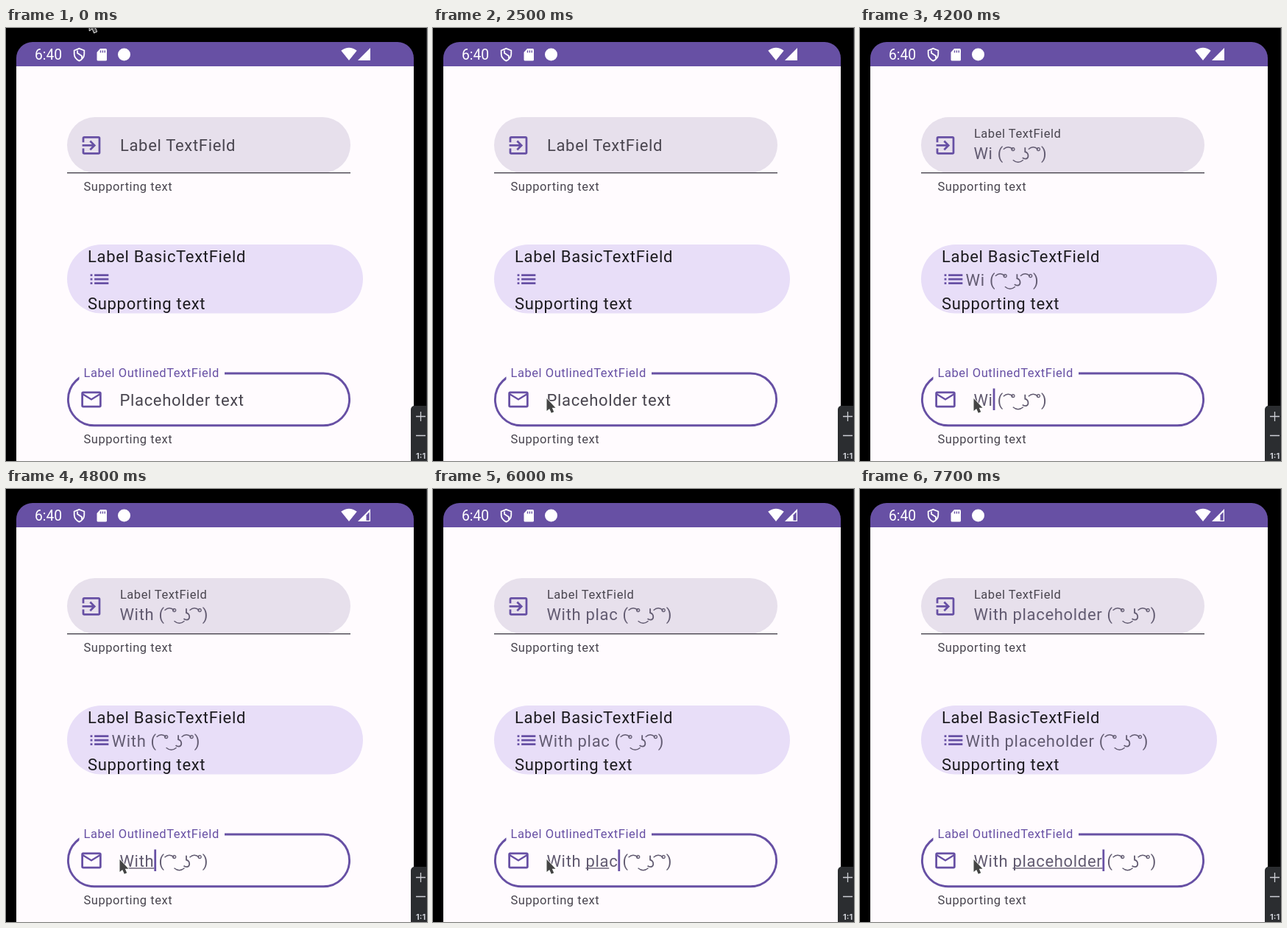
An HTML page that plays this animation: 572x588 px, repeating every 8000 ms.

```html
<!DOCTYPE html>
<html lang="en">
<head>
<meta charset="utf-8">
<style>
  html, body { margin: 0; width: 100%; height: 100%; overflow: hidden; background: #000; }
  svg { display: block; width: 572px; height: 588px; }
  text { font: 22px Roboto, sans-serif; letter-spacing: .687px; white-space: pre; fill: #49454f; }
  .small { font-size: 16.5px; letter-spacing: .55px; }
  .dark { fill: #1c1b1f; }
  .accent { fill: #6750a4; }
  .typed { fill: #625b71; }
  .stroke { fill: none; stroke: #625b71; }
</style>
</head>
<body>
<svg viewBox="0 0 572 588">
  <defs>
    <g id="face">
      <text class="typed" x="0 17 51.5 59.2">(°°)</text>
      <path class="stroke" stroke-width="1.4" d="M8-13Q14.5-19 21-13M21 1.5Q28 7.5 35 1.5M42-13Q48.5-19 55-13"/>
      <path class="stroke" stroke-width="1.8" d="M37.5-15.5V-9.5C43-8 43 0 38 0Q35.5 0 34-1.5"/>
    </g>
  </defs>
  <rect width="572" height="588"/>
  <rect x="571" width="1" height="588" fill="#2b2d30"/>

  <path fill="#fffbfe" d="M14 50H554V588H14z"/>
  <path class="accent" d="M14 52V41a22 22 0 0 1 22-22H532a22 22 0 0 1 22 22V52z"/>
  <text x="39" y="43.2" style="font-size:19.3px;letter-spacing:0;fill:#fff">6:40</text>
  <g fill="none" stroke="#fff" stroke-width="1.8">
    <path d="M99.5 27.8L106.3 30.5V35.5Q106 41.5 99.5 44.6Q93 41.5 92.7 35.5V30.5z"/>
    <path d="M97 30.500V34L103 38V41.500"/>
  </g>
  <path fill="#fff" d="M128 28H135.5a1.5 1.5 0 0 1 1.5 1.5V43a1.5 1.5 0 0 1-1.5 1.5H125a1.5 1.5 0 0 1-1.5-1.5V33z"/>
  <path stroke="#6750a4" stroke-width="1.4" d="M128.5 30.5v3M131.400 30.5v3M134.300 30.5v3"/>
  <circle cx="160.5" cy="36" r="8.5" fill="#fff"/>
  <path fill="#fff" d="M466 44L455.3 30.7Q466 23 476.7 30.7zM495 27V44H478z"/>
  <path id="weakSignal" class="accent" d="M489.500 35.500L493.7 31.300V42.700H489.500z"/>

  <rect x="83" y="121" width="385" height="76" rx="38" fill="#e7e0ec"/>
  <rect x="83" y="196" width="385" height="1.4" fill="#49454f"/>
  <path class="accent" transform="translate(99.5 143) scale(1.374)" d="M10.09 15.59L11.5 17l5-5-5-5-1.41 1.41L12.67 11H3v2h9.67zM19 3H5a2 2 0 0 0-2 2v4h2V5h14v14H5v-4H3v4a2 2 0 0 0 2 2h14a2 2 0 0 0 2-2V5a2 2 0 0 0-2-2z"/>
  <text id="label">Label TextField</text>
  <text class="small" x="105.5" y="220.7">Supporting text</text>

  <rect x="83" y="294" width="402" height="93.5" rx="46.7" fill="#e8def8"/>
  <text class="dark" x="111" y="317.7">Label BasicTextField</text>
  <path class="accent" transform="translate(110.5 324.7) scale(1.374)" d="M3 13h2v-2H3zM3 17h2v-2H3zM3 9h2V7H3zM7 13h14v-2H7zM7 17h14v-2H7zM7 7v2h14V7z"/>
  <text class="dark" x="111" y="381.7">Supporting text</text>

  <rect x="84.4" y="469" width="382.2" height="70.8" rx="35.4" fill="none" stroke="#6750a4" stroke-width="2.9"/>
  <rect x="99.5" y="460" width="197.5" height="18" fill="#fffbfe"/>
  <text class="small accent" x="105.5" y="474">Label OutlinedTextField</text>
  <path class="accent" transform="translate(99.5 488) scale(1.374)" d="M22 6a2 2 0 0 0-2-2H4a2 2 0 0 0-2 2v12a2 2 0 0 0 2 2h16a2 2 0 0 0 2-2zm-2 0l-8 5-8-5zm0 12H4V8l8 5 8-5z"/>
  <text id="placeholder" x="154.4" y="513.2">Placeholder text</text>
  <text class="small" x="105.5" y="564">Supporting text</text>

  <g id="fields"></g>
  <rect id="underline" y="514.3" height="1.4" fill="#625b71"/>
  <rect id="caret" class="accent" y="489.5" width="2.75" height="29.5"/>

  <path fill="#2b2d30" d="M572 513H555a5 5 0 0 0-5 5V588H572z"/>
  <path stroke="#ced0d6" stroke-width="1.3" d="M557 527.5h13M563.5 521v13M557 553.5h13"/>
  <text x="557" y="584.7" style="font:bold 11px Inter,sans-serif;letter-spacing:0;fill:#ced0d6">1:1</text>

  <path id="pointer" fill="#444" stroke="#fff" stroke-width="1.6" stroke-linejoin="round" paint-order="stroke" d="M.5.5V17.5L4.2 14.500L6.800 20.300L10.200 18.800L7.800 13.300H12.500z"/>
</svg>
<script>
const LOOP = 8000, STEP = 100;
const PHRASE = "With placeholder", TEXT_X = 154.4;
const $ = id => document.getElementById(id);

// [time, typed characters, end of the underlined part]
const TYPING = [
  [0, 0, 0], [4100, 1, 0], [4200, 2, 0], [4400, 3, 2], [4600, 4, 3], [4800, 4, 4],
  [5200, 5, 4], [5300, 5, 0], [5500, 6, 0], [5800, 7, 6], [5900, 8, 7], [6000, 9, 8],
  [6200, 10, 9], [6300, 10, 10], [6700, 11, 0], [6900, 12, 11], [7100, 13, 12],
  [7200, 14, 13], [7400, 15, 14], [7500, 16, 15], [7700, 16, 16]
];
const BLINKS = [400, 900, 1000, 1500, 2000, 2500, 3000, 3500, 4000, 5100, 5200];
// [start, end, x, y]
const MOVES = [[0, 400, 166, 440], [700, 1000, 178.5, 504], [1800, 2100, 154, 502.5]];

const ruler = document.createElement("canvas").getContext("2d");
ruler.font = "22px Roboto, sans-serif";
ruler.letterSpacing = "0.687px";
const widthOf = s => ruler.measureText(s).width;
const clamp = v => Math.max(0, Math.min(1, v));
const show = (el, on) => el.setAttribute("visibility", on ? "visible" : "hidden");
const place = (el, x, y) => el.setAttribute("transform", `translate(${x} ${y})`);

const ROWS = [[TEXT_X, 177.7], [143.5, 349.7], [TEXT_X, 513.2]];
$("fields").innerHTML = ROWS.map(([x, y]) =>
  `<g transform="translate(${x} ${y})"><text class="typed"></text><use href="#face"/></g>`).join("");
const rows = [...$("fields").children];

function drawPointer(t) {
  let x = 113, y = -14;
  for (const [start, end, toX, toY] of MOVES) {
    const p = clamp((t - start) / (end - start));
    const k = p * p * (3 - 2 * p);
    x += (toX - x) * k;
    y += (toY - y) * k;
  }
  place($("pointer"), x, y);
}

function drawText(t) {
  const [, count, lineEnd] = TYPING.filter(s => s[0] <= t).pop();
  const typed = PHRASE.slice(0, count), shown = typed.trimEnd();
  show($("placeholder"), !count);
  show($("fields"), count);
  for (const row of rows) {
    row.firstChild.textContent = shown;
    place(row.lastChild, widthOf(shown + " "), 0);
  }

  const lineStart = widthOf(PHRASE.slice(0, count > 5 ? 5 : 0));
  $("underline").setAttribute("x", TEXT_X + lineStart);
  $("underline").setAttribute("width", Math.max(0, widthOf(PHRASE.slice(0, lineEnd)) - lineStart));

  $("caret").setAttribute("x", TEXT_X + widthOf(typed));
  show($("caret"), BLINKS.filter(b => b <= t).length % 2);
}

function drawLabel(t) {
  const k = clamp((t - 4000) / 200), label = $("label");
  label.style.fontSize = 22 - 5.5 * k + "px";
  label.style.letterSpacing = .687 - .137 * k + "px";
  place(label, TEXT_X + .5, 167 - 18.4 * k);
}

function render(time) {
  const t = Math.floor(time % LOOP / STEP) * STEP;
  drawPointer(t);
  drawText(t);
  drawLabel(t);
  show($("weakSignal"), t >= 4600);
}

const begin = performance.now();
function tick() {
  render(performance.now() - begin);
  requestAnimationFrame(tick);
}
tick();
</script>
</body>
</html>
```
